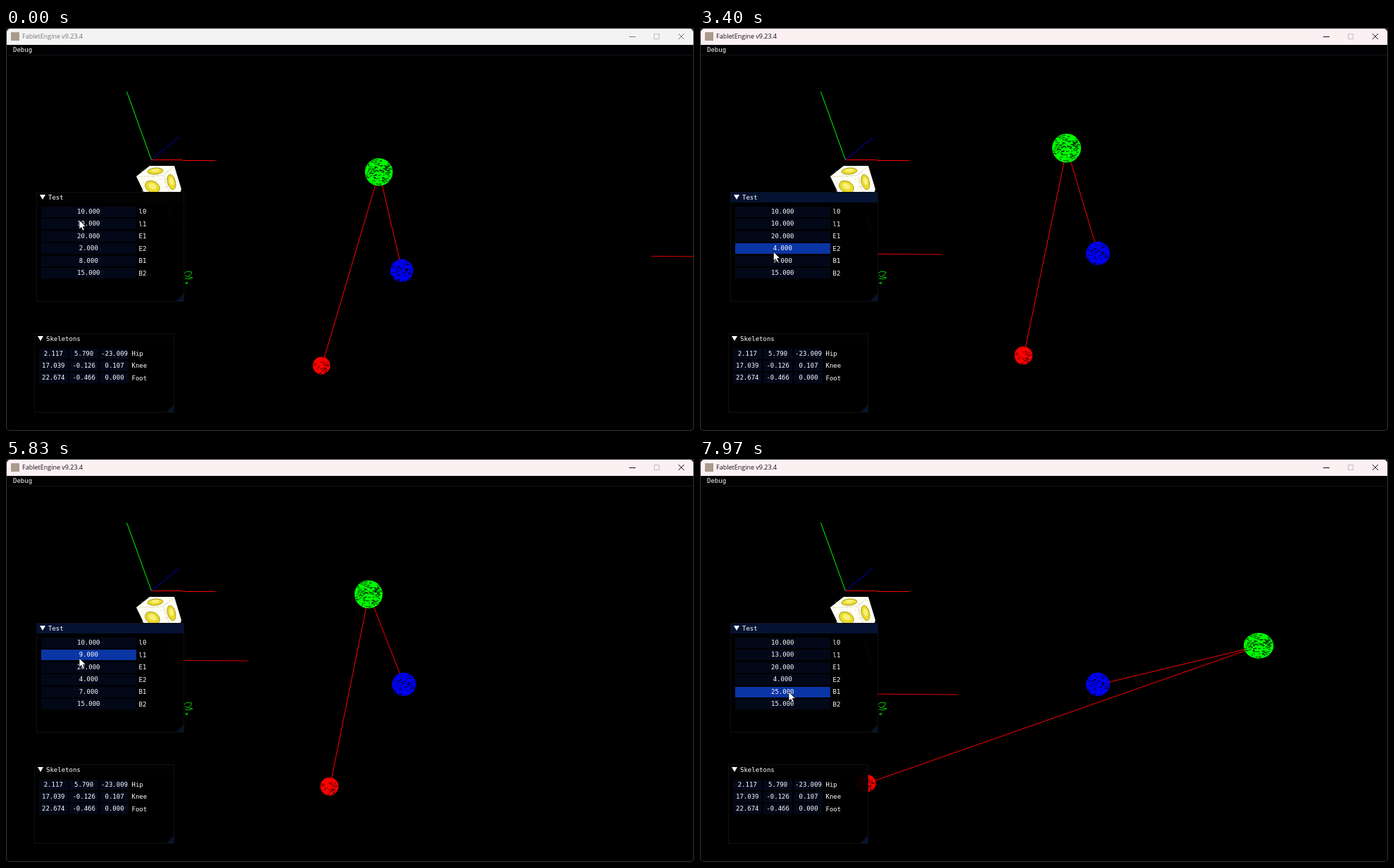
Recreate the animation shown at these times as an HTML page with a canvas. Size 977x573 px, loop 8 s.

```html
<!DOCTYPE html>
<html lang="en">
<head>
<meta charset="utf-8">
<title>Two-bone IK test</title>
<style>
  html, body { margin: 0; width: 100%; height: 100%; overflow: hidden; background: #000; }
  :where(#stage *) { position: absolute; left: 0; top: 0; box-sizing: border-box; }
  #stage { position: relative; width: 977px; height: 573px; overflow: hidden; background: #000; color: #fff;
    font: 9px/14px "DejaVu Sans Mono", monospace; white-space: nowrap; }
  #frame { width: 977px; height: 573px; border: 1px solid #353535; border-radius: 0 0 6px 6px; }
  #bar { left: 1px; top: 1px; width: 975px; height: 23px; background: #f3f3f3; color: #777;
    border-radius: 5px 5px 0 0; font: 9px/22px "Open Sans", sans-serif; }
  #bar.on { background: #fdf0f3; color: #111; }
  #bar i { left: 6px; top: 5px; width: 12px; height: 12px; background: #a99c8c; }
  #bar b { left: 22px; font-weight: 400; }
  #menu { left: 1px; top: 24px; width: 975px; height: 15px; background: #010103; border-bottom: 1px solid #131316; }
  #menu span { left: 9px; }
  .win { background: rgba(0, 0, 0, .94); border: 1px solid #101014; }
  #test { left: 43px; top: 233px; width: 210px; height: 156px; }
  #bones { left: 40px; top: 434px; width: 199px; height: 113px; }
  .head { width: 100%; height: 14px; background: #020203; }
  .win.on .head { background: #051231; }
  .head::before { content: ""; position: absolute; left: 4px; top: 3px;
    border: 4px solid transparent; border-top: 7px solid #fff; border-bottom: 0; }
  .head span { left: 16px; }
  .grip { left: auto; top: auto; right: 0; bottom: 0;
    border: 5px solid #06142c; border-top-color: transparent; border-left-color: transparent; }
  .cell { height: 15px; background: #030818; text-align: center; line-height: 15px; }
  .cell.hover { background: #051d5f; }
  .cell.active { background: #0a35a4; }
</style>
</head>
<body>
<div id="stage">
  <canvas id="view" width="977" height="573"></canvas>
  <div id="menu"><span>Debug</span></div>
  <div id="bar">
    <i></i><b>FabletEngine v9.23.4</b>
    <svg width="975" height="23" fill="none" stroke="currentColor">
      <path d="M884 11.5h9M954 7l8 8m0-8l-8 8"/>
      <rect x="919.5" y="7.5" width="7" height="7" stroke="#c4bdbf"/>
    </svg>
  </div>
  <div id="test" class="win"><div class="head"><span>Test</span></div><div class="grip"></div></div>
  <div id="bones" class="win"><div class="head"><span>Skeletons</span></div><div class="grip"></div></div>
  <div id="frame"></div>
  <svg id="cursor" width="14" height="18">
    <path d="M.5.5v13.2l3-2.8 2.1 4.8 2.3-1-2.1-4.6h4.2z" fill="#fff" stroke="#000" stroke-width=".8"/>
  </svg>
</div>
<script>
const $ = id => document.getElementById(id);
const ctx = $('view').getContext('2d');
const LOOP = 8000;
const start = { l0: 10, l1: 10, E1: 20, E2: 2, B1: 8, B2: 15 };
const keys = Object.keys(start);

// What the mouse does: free moves, and drags that add one unit per pixel
const move = (t0, t1, x, y) => ({ t0, t1, x, y });
const drag = (t0, t1, key, by) => ({ t0, t1, key, by });
const steps = [
  move(30, 400, 92, 346),
  drag(450, 800, 'B2', 5), drag(870, 1000, 'B2', 3), drag(1170, 1300, 'B2', -8),
  move(1600, 1750, 95, 331),
  drag(1800, 2200, 'B1', 11), drag(2340, 2370, 'B1', 1), drag(2570, 2630, 'B1', -10), drag(2800, 2970, 'B1', -3),
  move(2990, 3130, 102, 318),
  drag(3300, 3600, 'E2', 7), drag(3770, 4090, 'E2', -5),
  move(4230, 4370, 104, 303), move(4530, 4750, 105, 283),
  drag(4800, 5170, 'l1', 6), drag(5330, 5800, 'l1', -7), drag(5870, 6130, 'l1', 3), drag(6170, 6230, 'l1', 1),
  move(6570, 6720, 119, 320), move(6760, 7000, 108, 331),
  drag(7100, 7270, 'B1', 1), drag(7470, 7960, 'B1', 17)
];

// Replays the steps up to time t
function stateAt(t) {
  const s = { v: { ...start }, x: 104, y: 273, grab: [916, 322], active: '', focused: false };
  for (const { t0, t1, x, y, key, by } of steps) {
    if (t < t0) break;
    const f = Math.min(1, (t - t0) / (t1 - t0));
    if (key) {
      s.v[key] += Math.round(by * f);
      s.x += by * f;
      s.grab = [s.x, s.y];
      s.focused = true;
    } else {
      s.x += (x - s.x) * f;
      s.y += (y - s.y) * f;
    }
    s.active = key || '';
  }
  return s;
}

function add(parent, cls, x, y, w, text) {
  const el = document.createElement('div');
  el.className = cls;
  el.style.cssText = `left:${x}px;top:${y}px;` + (w ? `width:${w}px` : '');
  el.textContent = text;
  parent.append(el);
  return el;
}
const rowY = i => 253.5 + i * 17.55;
const cells = keys.map((k, i) => {
  add($('test'), '', 144.5, rowY(i) - 233.5, 0, k);
  return add($('test'), 'cell', 5.5, rowY(i) - 234, 135.5, '');
});
['2.117 5.790 -23.009 Hip', '17.039 -0.126 0.107 Knee', '22.674 -0.466 0.000 Foot'].forEach((row, i) =>
  row.split(' ').forEach((s, j) => {
    const y = 20.5 + i * 17.4;
    if (j < 3) add($('bones'), 'cell', 6 + j * 43.4, y, 40.5, s);
    else add($('bones'), '', 137.5, y + .5, 0, s);
  }));

// World plane to screen, with perspective depth w
function project([u, v]) {
  const s = v + 13, w = 1 - .0148 * s - .0004 * (u - 12);
  return { x: (304.45 + 11.96 * u - 7.21 * s) / w, y: (479.3 + .06 * u - 14.22 * s) / w, w };
}

// Reach vector (clamped) and joint; the joint is null when out of reach
function solve({ l0, l1, E1, E2, B1, B2 }) {
  let dx = E1 - B1, dy = E2 - B2;
  const d = Math.hypot(dx, dy), max = l0 + l1, k = Math.min(1, max / d);
  const reach = [dx * k, dy * k];
  if (d > max || d < Math.abs(l0 - l1)) return { reach, joint: null };
  dx /= d; dy /= d;
  const a = (l0 * l0 - l1 * l1 + d * d) / (2 * d), h = Math.sqrt(l0 * l0 - a * a);
  return { reach, joint: [B1 + a * dx - h * dy, B2 + a * dy + h * dx] };
}

function random(seed) {
  return () => (seed = seed * 16807 % 2147483647) / 2147483647;
}
function line(color, ...pts) {
  ctx.strokeStyle = color;
  ctx.lineWidth = 1;
  ctx.beginPath();
  pts.forEach(([x, y]) => ctx.lineTo(x + .5, y + .5));
  ctx.stroke();
}
function oval(x, y, rx, ry, turn, fill, stroke) {
  ctx.beginPath();
  ctx.ellipse(x, y, rx, ry, turn, 0, 7);
  ctx.fillStyle = fill;
  ctx.fill();
  if (stroke) { ctx.strokeStyle = stroke; ctx.lineWidth = 1; ctx.stroke(); }
}

// Dense wireframe ball: a disc with small seeded gaps, widened away from the view centre
function sphere(p, color, gaps) {
  const r = 12.4 / p.w, rx = r * (1 + 1.7e-6 * (p.x - 488) ** 2), rnd = random(gaps);
  oval(p.x, p.y, rx, r, 0, color);
  ctx.strokeStyle = '#000';
  ctx.lineWidth = .8;
  ctx.beginPath();
  for (let i = 0; i < gaps; i++) {
    const a = rnd() * 6.283, q = Math.sqrt(rnd()) * .95, len = .7 + rnd();
    const x = p.x + Math.cos(a) * q * rx, y = p.y + Math.sin(a) * q * r;
    ctx.moveTo(x - len, y);
    ctx.lineTo(x + len, y + (rnd() - .5) * 1.6);
  }
  ctx.stroke();
}

function coin(x, y, rx, ry, turn) {
  oval(x, y, rx, ry, turn, '#eadb28', '#a8981c');
  oval(x, y - 1, rx * .55, ry * .5, turn, '#f8f07a');
}
function cube() {
  ctx.fillStyle = '#fffef4';
  ctx.fill(new Path2D('M204 196H239L249 229L247 236H197L185 211Z'));
  const rnd = random(77);
  for (let i = 0; i < 42; i++) {
    const x = 193 + rnd() * 46, y = 199 + rnd() * 32;
    line(i % 3 ? '#efe7a4' : '#cfc9b0', [x, y], [x + rnd() * 4 - 2, y + rnd() * 4 - 2]);
  }
  coin(212, 203.5, 11, 4.5, -.08);
  coin(208, 226, 11, 8, .5);
  coin(235, 219, 5.5, 11, -.25);
  line('#e4dfc4', [186, 211], [223, 209], [238, 196]);
  line('#e4dfc4', [223, 209], [232, 235]);
}

function scene(v, [gx, gy]) {
  ctx.clearRect(0, 0, 977, 573);
  line('#0f0', [171, 90], [206, 187]);
  line('#00c', [206, 187], [245, 155]);
  line('#f00', [206, 187], [250, 187], [251, 188], [297, 188]);
  cube();
  line('#777', [228, 249], [244, 291]);
  ctx.strokeStyle = '#0c0';
  ctx.stroke(new Path2D('M253 349l4-3 7 1-2 4-5 3-3-3M259 354l6 1-5 2-6-1M255 363l3-2-1 3-3-2'));
  line('#d00', [gx, gy + 2], [gx + 170, gy + 3], [gx + 239, gy + 3.5]);

  const { reach, joint } = solve(v), foot = project(reach);
  if (joint) {
    const mid = project(joint), end = project([v.E1, v.E2]);
    line('#f00', ...[foot, mid, end].map(p => [p.x, p.y]));
    sphere(mid, '#0f0', 150);
    sphere(end, '#00f', 70);
  }
  sphere(foot, '#f00', 34);
}

function draw(t) {
  const { v, x, y, grab, active, focused } = stateAt(t);
  scene(v, grab);
  $('cursor').style.transform = `translate(${x - .5}px,${y - .5}px)`;
  $('bar').className = focused ? 'on' : '';
  $('test').className = focused ? 'win on' : 'win';
  keys.forEach((k, i) => {
    const over = !active && t > 30 && y >= rowY(i) && y < rowY(i) + 15;
    cells[i].className = 'cell' + (k === active ? ' active' : over ? ' hover' : '');
    cells[i].textContent = v[k].toFixed(3);
  });
}

const began = performance.now();
function tick() {
  draw((performance.now() - began) % LOOP);
  requestAnimationFrame(tick);
}
tick();
</script>
</body>
</html>
```
